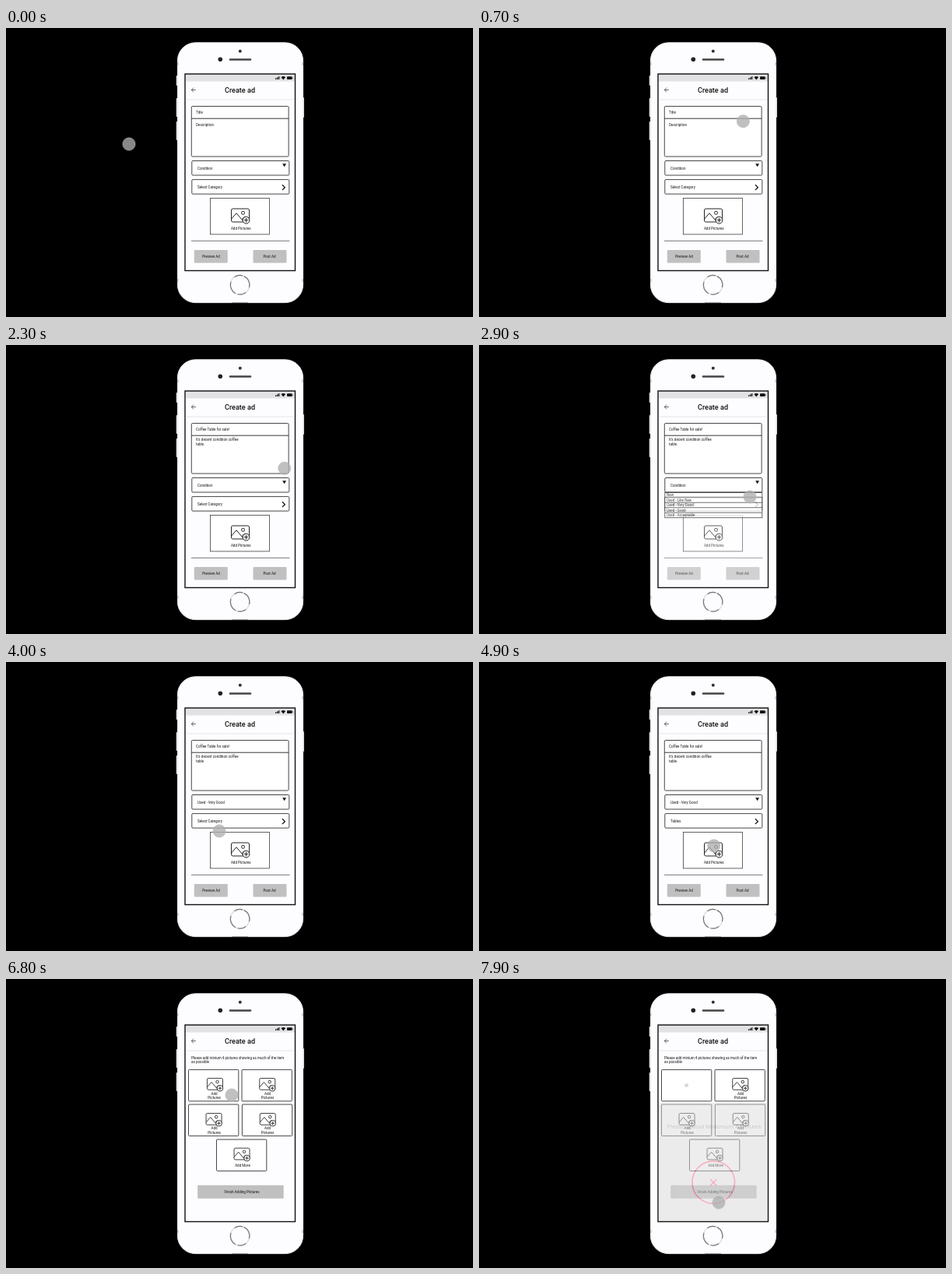
An HTML page that plays this animation: 600x371 px, repeating every 8000 ms.

```html
<!DOCTYPE html>
<html lang="en">
<head>
<meta charset="utf-8">
<title>Create ad prototype</title>
<style>
  html, body { margin: 0; width: 100%; height: 100%; overflow: hidden; background: #000; }
  svg { display: block; }
  text { font: 4.55px Roboto, Arial, sans-serif; fill: #111; }
  .mid { text-anchor: middle; }
  .box { fill: #fff; stroke: #333; stroke-width: .9; }
  .line { fill: none; stroke: #222; stroke-width: 1; }
  .btn { fill: #c0c0c0; }
  .page { fill: #fdfcfe; }
</style>
</head>
<body>
<svg width="600" height="371" viewBox="0 0 600 371">
  <defs>
    <g id="picture" class="line">
      <rect x=".5" y=".5" width="23" height="17" rx="2"/>
      <circle cx="15.5" cy="5.8" r="2"/>
      <path d="M.7 13.5 7 6.2 16 16.8M14.2 14l3-3.2 2 1.8"/>
      <circle cx="19.5" cy="15.2" r="4.4" fill="#fff"/>
      <path d="M16.8 15.2h5.4M19.5 12.5v5.4"/>
    </g>
  </defs>

  <!-- phone -->
  <g fill="#ddd">
    <rect x="218.7" y="61" width="3" height="13" rx="1"/>
    <rect x="218.7" y="90" width="3" height="24" rx="1"/>
    <rect x="218.7" y="120" width="3" height="24" rx="1"/>
    <rect x="380.5" y="89" width="2.5" height="26" rx="1"/>
  </g>
  <rect x="220.4" y="18.8" width="161.2" height="333.8" rx="23" fill="#fdfcfe" stroke="#eee6ec"/>
  <path d="M220 46h1.5M380.5 46h1.5M220 324h1.5M380.5 324h1.5" stroke="#bbb" stroke-width="4"/>
  <path d="M290 352.5h21" stroke="#999"/>
  <circle cx="300.8" cy="29.8" r="2" fill="#333"/>
  <circle cx="275.3" cy="40.3" r="2.8" fill="#222"/>
  <path d="M288 40.5h26" stroke="#444" stroke-width="2.6" stroke-linecap="round"/>
  <circle cx="300.6" cy="329.8" r="12.3" fill="none" stroke="#ddd" stroke-width="1.4"/>
  <circle cx="300.6" cy="329.8" r="12.3" fill="none" stroke="#777" stroke-width="1.2" stroke-dasharray="17 8 11 3" transform="rotate(-65 300.6 329.8)"/>
  <rect x="230" y="59" width="141.5" height="252.5" fill="#fdfcfe"/>
  <rect x="230" y="59" width="141.5" height="9.5" fill="#e2e2e4"/>
  <path d="M346.5 66v-1.5M348 66v-2.3M349.5 66v-3.2M351 66v-4" stroke="#111"/>
  <path d="M353.5 63.3q2.8-2.4 5.6 0L356.3 66.4z" fill="#111"/>
  <rect x="361" y="62.3" width="6.6" height="3.8" rx=".8" fill="#111"/>
  <path d="M368.2 63.5v1.5" stroke="#111" stroke-width=".7"/>
  <path d="M243.8 79.5h-5.6M241 76.7l-2.8 2.8 2.8 2.8" class="line" style="stroke:#555;stroke-width:.9"/>
  <text x="300.5" y="82.8" class="mid" style="font-size:9.1px;font-weight:500">Create ad</text>
  <path d="M231 92h140" stroke="#e6e6e8"/>

  <!-- form -->
  <g id="form">
    <rect class="box" x="238.3" y="100.5" width="124.8" height="64.5" rx="1.5"/>
    <path class="line" style="stroke-width:.9" d="M238.3 116.2h124.8"/>
    <text id="title0" x="244" y="110.3">Title</text>
    <text id="title1" x="244" y="110.3">Coffee Table for sale!</text>
    <text id="desc0" x="244" y="125.7">Description</text>
    <text id="desc1" x="244" y="123.2">It's decent condition coffee<tspan x="244" dy="5.5">table.</tspan></text>
    <rect class="box" x="238.8" y="170.5" width="125" height="18.5" rx="1.2"/>
    <text id="cond0" x="246" y="182">Condition</text>
    <text id="cond1" x="246" y="182">Used - Very Good</text>
    <path d="M355.2 174.2h4.8l-2.4 4z" fill="#111"/>
    <rect class="box" x="238.8" y="194.6" width="125" height="18.5" rx="1.2"/>
    <text id="cat0" x="246" y="206.2">Select Category</text>
    <text id="cat1" x="246" y="206.2">Tables</text>
    <path class="line" style="stroke-width:1.4" d="M355 201.3l3.3 3.4-3.3 3.4"/>
    <rect class="box" style="stroke-width:.75" x="262.5" y="218.4" width="76" height="46.5"/>
    <use href="#picture" x="289" y="231.5"/>
    <text class="mid" x="301.8" y="259.2">Add Pictures</text>
    <path d="M238 273.3h126.5" stroke="#777"/>
    <rect class="btn" x="241.8" y="285" width="43" height="16.5" rx="1"/>
    <rect class="btn" x="317.5" y="285" width="43" height="16.5" rx="1"/>
    <text class="mid" x="263.5" y="295">Preview Ad</text>
    <text class="mid" x="338.5" y="295">Post Ad</text>
    <g id="menu">
      <rect class="page" x="232" y="190" width="138" height="120" opacity=".35"/>
      <rect class="box" x="238.8" y="189.3" width="125" height="32.4"/>
    </g>
  </g>

  <!-- picture page -->
  <g id="pictures">
    <rect class="page" x="231" y="94" width="139.5" height="216"/>
    <text x="238" y="102.8">Please add minium 4 pictures showing as much of the item<tspan x="238" dy="5.5">as possible</tspan></text>
    <g id="slots"></g>
    <rect class="btn" x="246.2" y="264.8" width="110.5" height="17" rx="1"/>
    <text class="mid" x="303" y="275">Finish Adding Pictures</text>
  </g>

  <g id="error">
    <rect x="231" y="159" width="139.8" height="151.8" fill="#dcdcdc"/>
    <text class="mid" x="302" y="191.8" style="font-size:7.5px;fill:#999">Please Upload Miniumum 4 Pictures</text>
    <g fill="none" stroke="#f2607f">
      <circle cx="301.2" cy="261" r="27.3" stroke-width="1.6"/>
      <path d="M297.2 257.2l8 8m0-8l-8 8" stroke-width="1.3"/>
    </g>
  </g>
  <rect x="230" y="59" width="141.5" height="252.5" fill="none" stroke="#111" stroke-width="1.4"/>
  <circle id="cursor" r="8.2" fill="#aeaeae" fill-opacity=".78" stroke="#bbb" stroke-opacity=".6" stroke-width=".8"/>
</svg>
<script>
const LOOP = 8000, STEP = 100;
const $ = id => document.getElementById(id);

const options = ['New', 'Used - Like New', 'Used - Very Good', 'Used - Good', 'Used - Acceptable'];
$('menu').innerHTML += options.map((name, i) => {
  const y = 189.3 + i * 6.48;
  return `<path class="line" style="stroke-width:.8" d="M238.8 ${y}h125"/><text x="241" y="${y + 5}">${name}</text>`;
}).join('');

// box x, box y, icon x, icon y
const slots = [[234.5, 116.4, 258, 127], [303, 116.4, 325.3, 127], [234.5, 161, 256.6, 172],
  [303.4, 161, 325.8, 172], [270.5, 206, 292.6, 216.7]];
$('slots').innerHTML = slots.map(([x, y, ix, iy], i) => {
  const cx = i % 2 ? 336 : 267.6;
  const label = i == 4
    ? '<text class="mid" x="304" y="241.3">Add More</text>'
    : `<text class="mid" x="${cx}" y="${y + 32.3}">Add<tspan x="${cx}" dy="5.5">Pictures</tspan></text>`;
  return `<rect class="box" x="${x}" y="${y}" width="64.3" height="40.4" rx="1"/>
    <g id="slot${i}"><use href="#picture" transform="translate(${ix} ${iy}) scale(.87)"/>${label}</g>`;
}).join('') + '<rect id="thumb" x="264.3" y="134.5" width="4.5" height="4" fill="#d8d8d8"/>';

// time, x, y
const path = [[0, 158, 149], [100, 158, 149], [800, 350, 118], [1100, 353, 115], [1600, 359, 124],
  [1900, 359, 128], [2600, 357, 178], [2900, 348, 195], [3200, 318, 206], [3500, 290, 209],
  [4000, 274, 217], [4200, 280, 207], [4500, 284, 207], [5100, 308, 246], [5500, 317, 256],
  [5900, 334, 290], [6300, 356, 212], [6800, 290, 149], [7300, 290, 149], [7700, 306, 275],
  [7900, 308, 287], [LOOP, 308, 287]];

const ramp = (t, a, b) => Math.min(1, Math.max(0, (t - a) / (b - a)));
const show = (id, v) => $(id).setAttribute('opacity', v);
const swap = (id, p) => { show(id + 0, 1 - p); show(id + 1, p); };

function moveCursor(t) {
  const i = path.findIndex(k => k[0] > t);
  const [a, x0, y0] = path[i - 1], [b, x1, y1] = path[i];
  const p = ramp(t, a, b), e = p * p * (3 - 2 * p);
  $('cursor').setAttribute('transform', `translate(${x0 + (x1 - x0) * e} ${y0 + (y1 - y0) * e})`);
}

function draw(now) {
  const t = Math.floor(now % LOOP / STEP) * STEP;
  swap('title', ramp(t, 1000, 1300));
  swap('desc', ramp(t, 1800, 2100));
  swap('cond', ramp(t, 3250, 3500));
  swap('cat', ramp(t, 4200, 4500));
  show('menu', ramp(t, 2740, 2940) * (1 - ramp(t, 3250, 3500)));
  show('pictures', ramp(t, 5200, 5580));
  show('slot0', 1 - ramp(t, 7200, 7500));
  show('thumb', ramp(t, 7300, 7600));
  show('error', ramp(t, 7800, 8000));
  moveCursor(t);
  requestAnimationFrame(draw);
}
requestAnimationFrame(draw);
</script>
</body>
</html>
```
